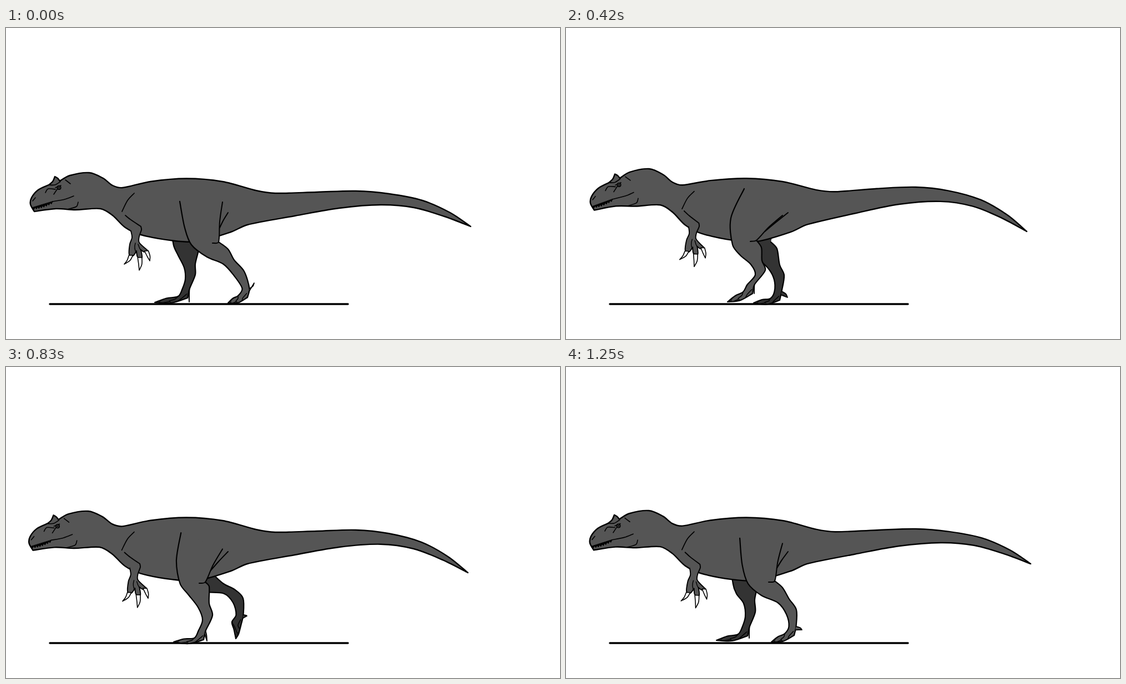
Write an HTML page that moves like this. It is 998x561 px and loops after 1.33 s.

```html
<!DOCTYPE html>
<html lang="en">
<head>
<meta charset="utf-8">
<title>Walking theropod</title>
<style>
html, body { margin: 0; width: 100%; height: 100%; overflow: hidden; background: #fff; }
svg { display: block; width: 998px; height: 561px; }
path, line { stroke-linecap: round; stroke-linejoin: round; }
</style>
</head>
<body>
<svg id="stage" viewBox="0 0 998 561"></svg>
<script>
const LOOP = 1330, STEPS = 16;
const SKIN = '#555', SHADE = '#333', INK = '#000';
const stage = document.getElementById('stage');

function add(tag, attrs, parent = stage) {
  const el = document.createElementNS('http://www.w3.org/2000/svg', tag);
  for (const k in attrs) el.setAttribute(k, attrs[k]);
  return parent.appendChild(el);
}
const shape = (fill, width, parent) => add('path',
  { fill, stroke: width ? INK : 'none', 'stroke-width': width || 0 }, parent);
const set = (el, d) => el.setAttribute('d', d);

const pairs = flat => flat.flatMap((v, i) => i % 2 ? [] : [[v, flat[i + 1]]]);
const mix = (a, b, u) => [a[0] + (b[0] - a[0]) * u, a[1] + (b[1] - a[1]) * u];
const shift = (p, x, y) => [p[0] + x, p[1] + y];
const clamp = u => Math.max(0, Math.min(1, u));

// Smooth curve through points
function curve(pts, start = 'M') {
  const f = v => v.toFixed(2);
  let d = start + f(pts[0][0]) + ' ' + f(pts[0][1]);
  for (let i = 0; i < pts.length - 1; i++) {
    const p0 = pts[i - 1] || pts[i], p1 = pts[i], p2 = pts[i + 1], p3 = pts[i + 2] || p2;
    // short neighbours limit the handles, so uneven spacing stays smooth
    const len = Math.hypot(p2[0] - p1[0], p2[1] - p1[1]);
    const handle = (a, b) => {
      const l = Math.hypot(b[0] - a[0], b[1] - a[1]) || 1;
      const k = Math.min(1 / 6, len / l / 3);
      return [(b[0] - a[0]) * k, (b[1] - a[1]) * k];
    };
    const h1 = handle(p0, p2), h2 = handle(p1, p3);
    d += 'C' + [p1[0] + h1[0], p1[1] + h1[1], p2[0] - h2[0], p2[1] - h2[1], ...p2].map(f).join(' ');
  }
  return d;
}
const chain = parts => parts.map((p, i) => curve(p, i ? 'L' : 'M')).join('');

// Cyclic cubic interpolation of pose rows
function sample(keys, rows, period, phase) {
  const n = keys.length;
  const wrap = i => ((i % n) + n) % n;
  const at = i => keys[wrap(i)] + Math.floor(i / n) * period;
  const row = i => rows[wrap(i)];
  let i = n - 1;
  while (keys[i] > phase) i--;
  const span = at(i + 1) - at(i), u = (phase - at(i)) / span, v = 1 - u;
  return row(i).map((a, k) => {
    const b = row(i + 1)[k];
    const m0 = (b - row(i - 1)[k]) / (at(i + 1) - at(i - 1)) * span * 0.7;
    const m1 = (row(i + 2)[k] - a) / (at(i + 2) - at(i)) * span * 0.7;
    return a + (b - a) * u * u * (3 - 2 * u) + m0 * u * v * v - m1 * u * u * v;
  });
}

// Leg over a full stride: crease, calf, shin, hock, ankle, toe tip, spur offset
const legKeys = [0, 2, 5, 7, 8, 10, 13, 15];
const legPoses = [
  [383,386, 381,406, 401,422, 420,443, 432,470, 400,496, 15,-10],
  [375,376, 373,398, 402,405, 418,421, 421,447, 414,490, 13,2],
  [343,383, 333,403, 343,423, 350,441, 333,463, 291,494, 6,16],
  [344,386, 326,402, 330,423, 332,446, 324,469, 271,493, 6,20],
  [345,387, 329,403, 331,429, 332,449, 324,471, 268,495, 6,23],
  [359,388, 347,403, 356,430, 363,452, 353,476, 302,496, 9,18],
  [369,386, 361,405, 375,431, 384,450, 382,475, 338,496, 17,11],
  [376,386, 371,405, 392,422, 406,442, 408,468, 370,496, 17,6]
];
// half widths across the four lower joints
const girth = pairs([19,-7, 10,-3.5, 9,-4, 6.5,0]);

// Body sway, twice per stride:
// neck y, head x, tail lift, tip x, tip y, arm x, arm y, arm turn
const swayKeys = [0, 2, 5, 7];
const sway = [
  [0, 0, 0, 0, 0, 0, 0, 0],
  [-1, -2.5, 0, -5, 13, -2, -3, 1],
  [-7, 0, -7, -7, 9, -4, -6, 4],
  [-2, -1, -2, 0, -3, -2, -2, 3.5]
];

const snout = pairs([51,331, 44,318, 46,306, 58,292, 77,283]);
const crest = pairs([77,283, 84,277, 88,268]);
const nape = pairs([88,268, 93,271, 97,276]);
const back = pairs([97,276, 115,266, 150,261, 175,271, 192,284, 210,288, 260,277, 325,271.5,
  390,277, 450,293, 485,298, 560,296, 630,294, 690,299, 750,311, 800,333, 837,358]);
const under = pairs([837,358, 790,340, 735,324, 675,319, 600,325, 520,339, 435,355, 405,368,
  345,385, 300,383.5, 243,373, 215,360, 192,338, 170,326, 125,328, 90,326, 51,331]);
const outline = [snout, crest, nape, back, under];

const headLines = [
  [84,313, 106,309, 122,303],
  [130,314, 127,322, 111,327],
  [77,283, 88,283, 98,277],
  [71,297, 76,290, 89,291],
  [92,291, 86,300],
  [89,288, 99,284],
  [107,274, 116,281],
  [48,312, 53,306]
].map(pairs);

// Jagged lip from snout to cheek
const teeth = Array.from({ length: 17 }, (_, i) => {
  const u = i / 16;
  return [48 + 36 * u, 324 - 11 * u + 2 * Math.sin(Math.PI * u) + (i % 2 ? 3.5 : 0)];
});
const shoulder = pairs([231,298, 219,311, 209,331]);

const arm = [
  [215,338, 225,346, 243,358],
  [243,358, 244,364, 240,376, 240,387, 256,402],
  [256,402, 249,404, 243,400],
  [243,400, 245,414, 237,413, 235,402],
  [235,402, 229,411, 222,409, 223,390, 227,378, 225,366]
].map(pairs);

function claw(x, y, tipX, tipY, half, bow) {
  const tip = [tipX, tipY], mid = mix([x, y], tip, 0.5);
  return chain([
    [[x - half, y], shift(mid, bow - half * 0.8, bow * 0.6), tip],
    [tip, shift(mid, bow + half * 0.7, bow * 0.6), [x + half, y]]
  ]) + 'Z';
}

function makeLeg(fill) {
  return { skin: shape(fill), edge: shape('none', 2.2), detail: shape('none', 1.5),
    nails: shape('#222', 1), spur: shape(fill, 1.8) };
}

add('line', { x1: 79, y1: 498, x2: 616, y2: 498, stroke: INK, 'stroke-width': 3.4 });
const farLeg = makeLeg(SHADE);
const body = shape(SKIN, 2.4);
const head = shape('none', 1.6);
const jaw = shape(INK, 1);
const eye = add('circle', { r: 3.2, fill: '#444', stroke: INK, 'stroke-width': 1.7 });
const pupil = add('circle', { r: 1.2, fill: INK });
const fold = shape('none', 1.7);
const armGroup = add('g', {});
set(shape(SKIN, 1.9, armGroup), chain(arm));
set(shape('#fff', 1.6, armGroup),
  claw(225, 410, 213, 426, 3.5, 2) + claw(241, 414, 240, 437, 3.8, 1.5) + claw(253, 402, 259, 420, 3.5, 1));
set(shape('none', 1.4, armGroup), 'M233 388Q230 398 235 406M238 390Q240 397 243 401');
const nearLeg = makeLeg(SKIN);
const creases = shape('none', 2);

function drawLeg(leg, phase) {
  const [crease, calf, shin, hock, ankle, tip, spurBy] =
    pairs(sample(legKeys, legPoses, STEPS, phase));
  // raise the foot through mid swing
  if (phase > 2 && phase < 5) {
    const lift = 8 * Math.sin(Math.PI * (phase - 2) / 3);
    tip[1] -= lift;
    ankle[1] -= lift * 0.7;
  }

  // the thigh follows the crease behind the knee
  const s = crease[0] - 343;
  const top = [313 + 8 * clamp(1 - s / 40) ** 2.5, 290 + s * 0.57];
  const front = [297 + s * 0.62, 343 + s * 0.42];
  const knee = [300 + s * 0.85, 391];
  const rear = [390, 338 - s * 0.6];
  const ham = shift(mix(rear, crease, 0.5), -1.5, -1);

  const bones = [calf, shin, hock, ankle];
  const fore = bones.map((p, i) => shift(p, -girth[i][0], -girth[i][1]));
  const aft = bones.map((p, i) => shift(p, ...girth[i]));
  const instep = shift(ankle, -14, 13), heel = shift(ankle, 3, 16);
  const toe = shift(mix(instep, tip, 0.5), 0, -2);
  const sole = shift(mix(tip, heel, 0.5), 0, 5);
  const spur = shift(ankle, ...spurBy);

  const edge = chain([
    [top, front, knee, ...fore, instep, toe, tip],
    [tip, sole, heel],
    [heel, ...aft.reverse(), crease]
  ]);
  set(leg.edge, edge);
  set(leg.skin, edge + curve([crease, ham, rear], 'L') + 'Z');

  const mid = mix(instep, sole, 0.4), end = mix(toe, sole, 0.6);
  set(leg.detail, curve([instep, mid, end, mix(end, sole, 0.7)]) +
    curve([mix(ankle, heel, 0.55), mix(mid, heel, 0.5), mix(sole, heel, 0.45)]));
  const nail = (a, b, c) => chain([[a, b], [b, c]]) + 'Z';
  set(leg.nails, nail(mix(tip, toe, 0.55), tip, mix(tip, sole, 0.25)) +
    nail(mix(end, sole, 0.15), mix(tip, sole, 0.5), sole));
  const root = aft[0];
  set(leg.spur, chain([
    [root, mix(mix(root, spur, 0.6), [spur[0], root[1]], 0.3), spur],
    [spur, mix(root, heel, 0.4)]
  ]));
  return { crease, ham, rear };
}

function draw(step) {
  const [neck, headX, lift, tipX, tipY, armX, armY, turn] =
    sample(swayKeys, sway, 8, step % 8);
  const warp = ([x, y]) => {
    const w = clamp((x - 400) / 200), root = w * w * (3 - 2 * w);
    const end = clamp((x - 640) / 197) ** 1.7;
    return [
      x + headX * clamp((230 - x) / 110) + tipX * end,
      y + neck * Math.exp(-(((x - 150) / 95) ** 2)) + lift * root + (tipY - lift) * end
    ];
  };
  const bend = pts => pts.map(warp);

  drawLeg(farLeg, (step + 8) % STEPS);
  set(body, chain(outline.map(bend)) + 'Z');
  set(head, headLines.map(l => curve(bend(l))).join(''));
  set(jaw, 'M' + bend(teeth).map(p => p.map(v => v.toFixed(2)).join(' ')).join('L') + 'Z');
  set(fold, curve(bend(shoulder)));
  const [ex, ey] = warp([95.5, 288]);
  for (const c of [eye, pupil]) {
    c.setAttribute('cx', ex);
    c.setAttribute('cy', ey);
  }
  armGroup.setAttribute('transform', `translate(${armX} ${armY}) rotate(${turn} 244 363)`);

  const { crease, ham, rear } = drawLeg(nearLeg, step);
  const join = mix(ham, crease, 0.35), fork = [400, 333];
  set(creases, curve([rear, ham, crease, shift(crease, -11, 2)]) +
    curve([fork, mix(mix(fork, join, 0.5), ham, 0.15), join]));
}

const startOf = k => Math.round(k * 25 / 3) * 10;
let shown = -1;
function tick() {
  const time = performance.now() % LOOP;
  let step = STEPS - 1;
  while (startOf(step) > time) step--;
  if (step !== shown) draw(shown = step);
  requestAnimationFrame(tick);
}
tick();
</script>
</body>
</html>
```
